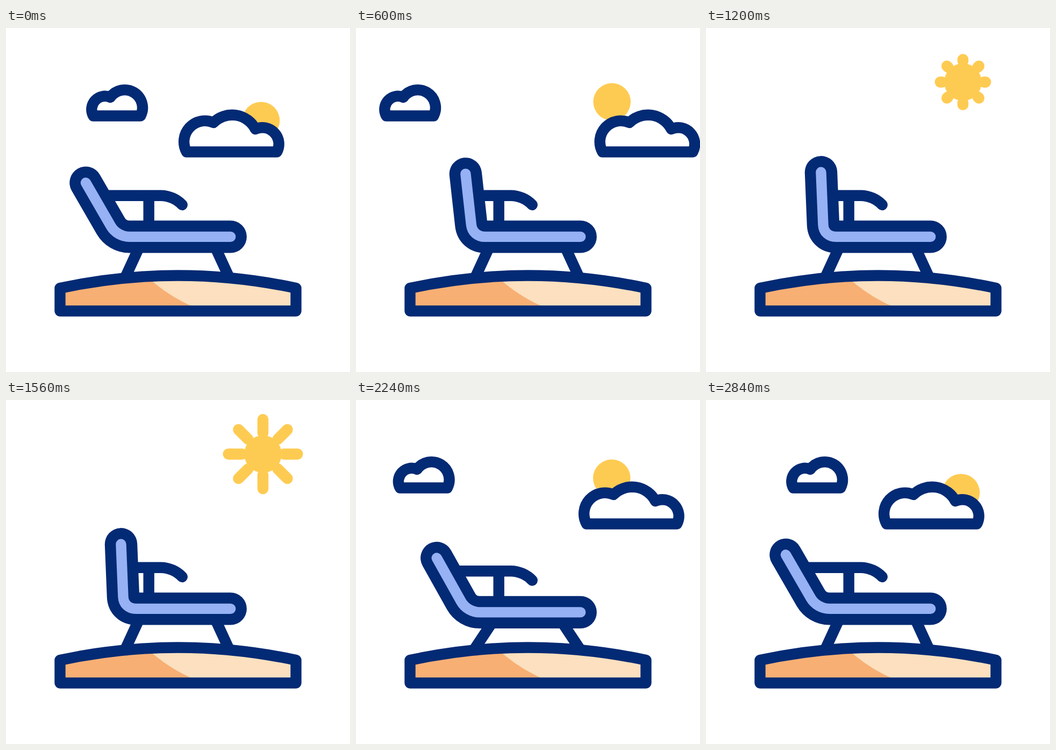
An HTML page for the animation above (3000 ms loop, 640 by 640 pixels).

```html
<!DOCTYPE html>
<html lang="en">
<head>
<meta charset="utf-8">
<title>Sun lounger</title>
<style>
  html, body { margin: 0; width: 100%; height: 100%; overflow: hidden; background: #fff; }
  svg { display: block; width: 100%; height: 100%; }
  .line { fill: none; stroke: #032a74; stroke-width: 20.4; stroke-linejoin: round; }
  .cloud { fill: #fff; }
  .round { stroke-linecap: round; }
  #frame { stroke-width: 60.4; }
  #pad { stroke: #96b1f4; stroke-width: 19.4; }
  #rays { fill: none; stroke: #fecb52; stroke-width: 20.6; stroke-linecap: round; }
</style>
</head>
<body>
<svg viewBox="0 0 640 640">
  <circle id="disc" r="34.8" fill="#fecb52"/>
  <path id="rays"/>
  <path id="small" class="line cloud" d="M162.5 163.5A24.6 24.6 0 0 1 194 129A33.1 33.1 0 0 1 250.3 163.5Z"/>
  <path id="large" class="line cloud" d="M336 230.5A39 39 0 0 1 386 176A49 49 0 0 1 464 188A30.8 30.8 0 0 1 504 230.5Z"/>
  <path id="legs" class="line"/>
  <path d="M100.5 484Q320 437 539.5 484V526.5H100.5Z" fill="#fce0bf"/>
  <path d="M100.5 484Q183 466 262 462Q300 498 349 519V526.5H100.5Z" fill="#f7af74"/>
  <path class="line" d="M100.5 484Q320 437 539.5 484V526.5H100.5Z"/>
  <g id="chair">
    <path id="arm" class="line round"/>
    <path class="line" d="M265.7 312V375"/>
    <path id="frame" class="line round"/>
    <path id="pad" class="line round"/>
  </g>
</svg>
<script>
const LOOP = 3000;
const $ = id => document.getElementById(id);
const set = (id, name, value) => $(id).setAttribute(name, value);
const lerp = (a, b, p) => a + (b - a) * p;
const span = (t, from, to) => Math.min(1, Math.max(0, (t - from) / (to - from)));
const smooth = u => u * u * (3 - 2 * u);

// cubic-bezier(.5, 0, .5, 1)
function strong(x) {
  let lo = 0, hi = 1;
  for (let i = 0; i < 24; i++) {
    const m = (lo + hi) / 2;
    if (1.5 * m * (1 - m) + m ** 3 < x) lo = m; else hi = m;
  }
  return smooth((lo + hi) / 2);
}

const soft = (t, from, to) => smooth(span(t, from, to));
const hard = (t, from, to) => strong(span(t, from, to));
const bump = (t, from) => soft(t, from, from + 120) - soft(t, from + 120, from + 290);

function drawSun(t) {
  const rise = soft(t, 60, 1160) - hard(t, 1746, 2624);
  const cx = lerp(474.5, 478, rise), cy = lerp(172.2, 100.6, rise);
  set('disc', 'cx', cx);
  set('disc', 'cy', cy);

  const inner = lerp(39, 64.3, soft(t, 1690, 2030));
  const outer = lerp(39, 64.3, soft(t, 1100, 1560));
  let d = '';
  if (outer - inner > 0.05) {
    for (let i = 0; i < 8; i++) {
      const c = Math.cos(i * Math.PI / 4), s = Math.sin(i * Math.PI / 4);
      d += `M${cx + c * inner} ${cy + s * inner}L${cx + c * outer} ${cy + s * outer}`;
    }
  }
  set('rays', 'd', d);
}

function drawClouds(t) {
  const away = hard(t, 20, 1350) - hard(t, 1480, 2720);
  set('small', 'transform', `translate(${-282 * away} 0)`);
  set('large', 'transform', `translate(${326 * away} 0)`);
}

function drawChair(t) {
  const up = soft(t, 150, 750) - soft(t, 1700, 2300);
  const press = bump(t, 605) + bump(t, 2120);
  const drop = 6.5 * press;

  const x = lerp(206.5, 219, up);
  const ax = lerp(195, 218, up), ay = lerp(368.5, 366, up);
  const back = `M${lerp(148.5, 214, up)} ${lerp(288, 268.3, up)}L${ax} ${ay}` +
    `C${lerp(ax, x, .6)} ${lerp(ay, 388.4, .6)} ${x + 9} 388.4 ${x + 23} 388.4H417.7`;
  set('frame', 'd', back);
  set('pad', 'd', back);
  set('arm', 'd', `M${lerp(186, 235, up)} 311.7H288C303 311.7 318 318.5 327.8 329`);
  set('chair', 'transform', `translate(0 ${drop})`);

  const top = lerp(251.3, 258.3, press), foot = lerp(222.3, 220.7, press);
  const y = 400 + drop;
  set('legs', 'd', `M${top} ${y}L${foot} 463M${637 - top} ${y}L${637 - foot} 463`);
}

function draw(t) {
  drawSun(t);
  drawClouds(t);
  drawChair(t);
}

const start = performance.now();
function tick() {
  draw((performance.now() - start) % LOOP);
  requestAnimationFrame(tick);
}
tick();
</script>
</body>
</html>
```
